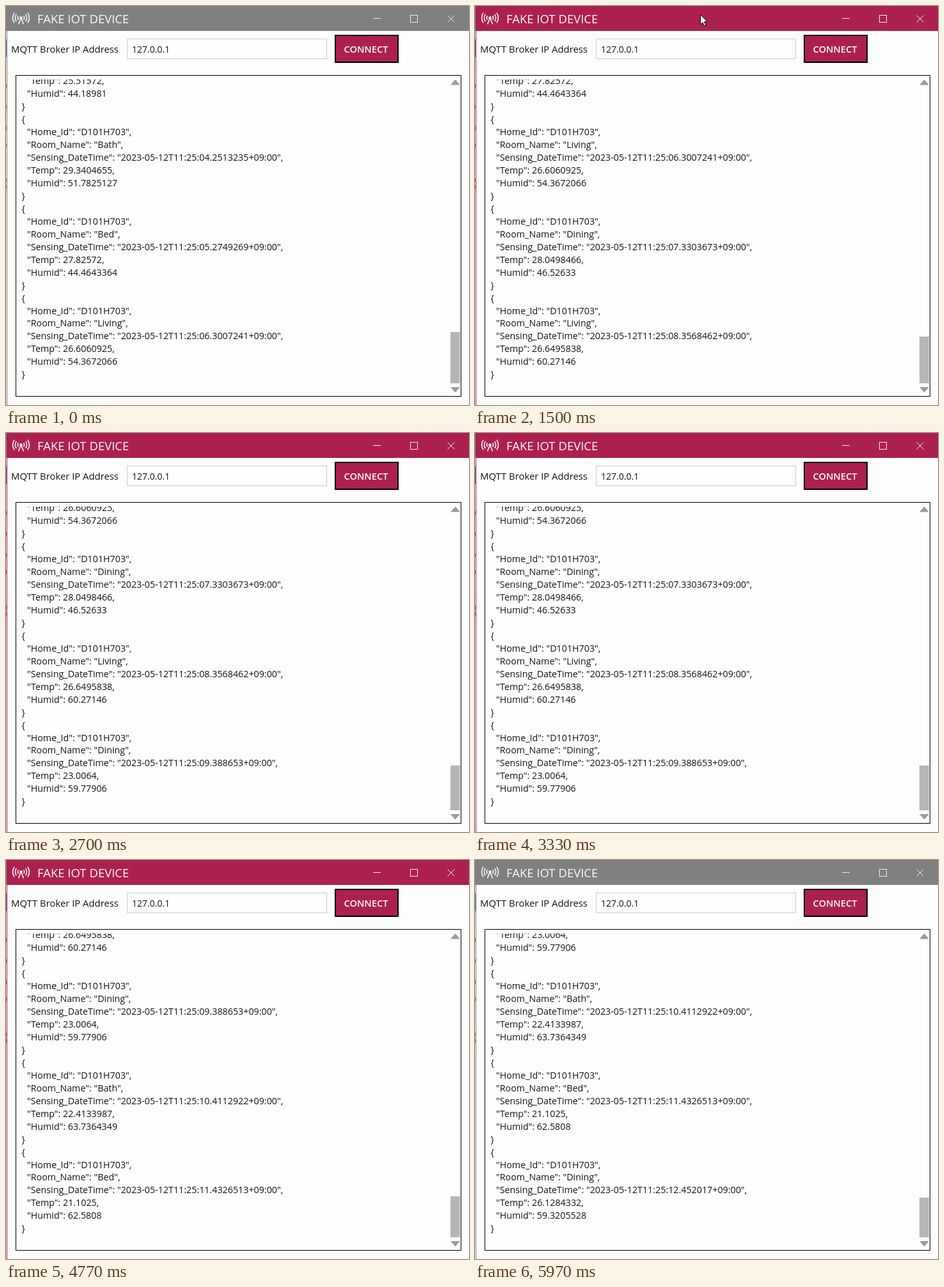
An HTML page with a canvas for the animation above (6.01 s loop, 724 px wide and 624 px high).

```html
<!DOCTYPE html>
<html lang="en">
<head>
<meta charset="utf-8">
<title>Fake IoT Device</title>
<style>
  html, body { margin: 0; width: 100%; height: 100%; overflow: hidden; background: #fdfdfe; }
  canvas { display: block; }
</style>
</head>
<body>
<canvas id="stage" width="724" height="624"></canvas>
<script>
const ctx = document.getElementById('stage').getContext('2d');
const LOOP = 6010;
const PAPER = '#fdfdfe', INK = '#141414', LIGHT = '#fbfbfb';
const CRIMSON = '#ac204f', GREY = '#808080';
const FACE = '"Open Sans", "Noto Sans", sans-serif';

// room, seconds, temperature, humidity
const readings = [
  ['Living', '03.2280014', '25.51572', '44.18981'],
  ['Bath', '04.2513235', '29.3404655', '51.7825127'],
  ['Bed', '05.2749269', '27.82572', '44.4643364'],
  ['Living', '06.3007241', '26.6060925', '54.3672066'],
  ['Dining', '07.3303673', '28.0498466', '46.52633'],
  ['Living', '08.3568462', '26.6495838', '60.27146'],
  ['Dining', '09.388653', '23.0064', '59.77906'],
  ['Bath', '10.4112922', '22.4133987', '63.7364349'],
  ['Bed', '11.4326513', '21.1025', '62.5808'],
  ['Dining', '12.452017', '26.1284332', '59.3205528']
];
const FIRST_AT = 290, PERIOD = 1026;
const FOCUS_ON = 1100, FOCUS_OFF = 5900;

function box(x, y, w, h, fill) {
  ctx.fillStyle = fill;
  ctx.fillRect(x, y, w, h);
}

function frame(x, y, w, h, color) {
  ctx.strokeStyle = color;
  ctx.lineWidth = 1;
  ctx.strokeRect(x + .5, y + .5, w - 1, h - 1);
}

function label(str, x, y, size, color = INK, weight = 400) {
  ctx.font = `${weight} ${size}px ${FACE}`;
  ctx.fillStyle = color;
  ctx.fillText(str, x, y);
}

function shape(points, fill, stroke) {
  ctx.beginPath();
  points.forEach(([x, y]) => ctx.lineTo(x, y));
  ctx.closePath();
  ctx.fillStyle = fill;
  ctx.fill();
  if (stroke) {
    ctx.strokeStyle = stroke;
    ctx.lineWidth = 1;
    ctx.stroke();
  }
}

function line(x1, y1, x2, y2) {
  ctx.beginPath();
  ctx.moveTo(x1, y1);
  ctx.lineTo(x2, y2);
  ctx.stroke();
}

function antenna(x, y) {
  ctx.strokeStyle = LIGHT;
  ctx.lineWidth = 1.6;
  for (const r of [5, 9, 13]) {
    for (const side of [0, Math.PI]) {
      ctx.beginPath();
      ctx.arc(x, y, r, side - .65, side + .65);
      ctx.stroke();
    }
  }
  ctx.beginPath();
  ctx.arc(x, y, 2.2, 0, 7);
  ctx.fillStyle = LIGHT;
  ctx.fill();
  line(x, y, x - 4, y + 10);
  line(x, y, x + 4, y + 10);
}

function titleBar(color) {
  box(1, 0, 723, 39, color);
  antenna(23.5, 18.5);
  label('FAKE IOT DEVICE', 49, 27, 18.5, LIGHT);
  ctx.strokeStyle = '#ececec';
  ctx.lineWidth = 1;
  line(574, 19.5, 586, 19.5);
  ctx.strokeRect(632.5, 14.5, 11, 11);
  line(690.5, 14.5, 701.5, 25.5);
  line(690.5, 25.5, 701.5, 14.5);
}

function leftEdge(color) {
  box(1, 39, 1, 585, color);
  box(0, 0, 1, 39, '#808080');
  box(0, 52, 1, 28, '#4a86b0');
  for (const y of [122, 155, 188, 215, 270, 280]) box(0, y, 1, 6, '#c88868');
}

function form() {
  label('MQTT Broker IP Address', 8, 73, 14.85);
  frame(189, 51, 313, 32, '#cccccc');
  label('127.0.0.1', 197, 73, 14);
  box(514, 45, 100, 44, '#000');
  box(516, 47, 96, 40, CRIMSON);
  label('CONNECT', 528.5, 73, 14.6, LIGHT, 600);
}

function record([room, sec, temp, humid], row) {
  const rows = [
    '{',
    '"Home_Id": "D101H703",',
    `"Room_Name": "${room}",`,
    `"Sensing_DateTime": "2023-05-12T11:25:${sec}+09:00",`,
    `"Temp": ${temp},`,
    `"Humid": ${humid}`,
    '}'
  ];
  rows.forEach((str, i) => {
    const y = Math.floor(142.89 + 19.95 * (row + i));
    label(str, str.length > 1 ? 33 : 24.5, y, 14.28);
  });
}

function log(count) {
  frame(15, 108, 697, 503, '#000');
  ctx.save();
  ctx.beginPath();
  ctx.rect(17, 115, 676, 490);
  ctx.clip();
  for (let i = 0; i < 4; i++) record(readings[count + i], 7 * i - 5);
  ctx.restore();

  const arrow = '#9c9c9c';
  shape([[695, 123.5], [702.5, 115], [710, 123.5]], arrow);
  shape([[695, 596], [702.5, 604.5], [710, 596]], arrow);
  const h = Math.round(1656 / (20.7 + count));
  box(695, 590 - h, 15, h, '#b6b6b6');
}

const ease = p => p * p * (3 - 2 * p);
const ramp = (t, a, b) => ease(Math.min(1, Math.max(0, (t - a) / (b - a))));

function pointer(t) {
  if (t < 350 || t > 2000) return;
  const away = 1 - ramp(t, 350, 570) + ramp(t, 1600, 2000);
  ctx.save();
  ctx.translate(352 + 380 * away, 13 + 620 * away);
  shape([[.5, .5], [.5, 16], [4, 12.6], [6.5, 18.3], [9, 17.2], [6.6, 11.7], [11.3, 11.5]],
    '#fff', '#000');
  ctx.restore();
}

function draw(t) {
  const accent = t >= FOCUS_ON && t < FOCUS_OFF ? CRIMSON : GREY;
  const count = Math.min(6, Math.max(0, Math.floor((t - FIRST_AT) / PERIOD) + 1));
  box(0, 0, 724, 624, PAPER);
  titleBar(accent);
  leftEdge(accent);
  form();
  log(count);
  pointer(t);
}

const start = performance.now();
function tick() {
  draw((performance.now() - start) % LOOP);
  requestAnimationFrame(tick);
}
tick();
</script>
</body>
</html>
```
